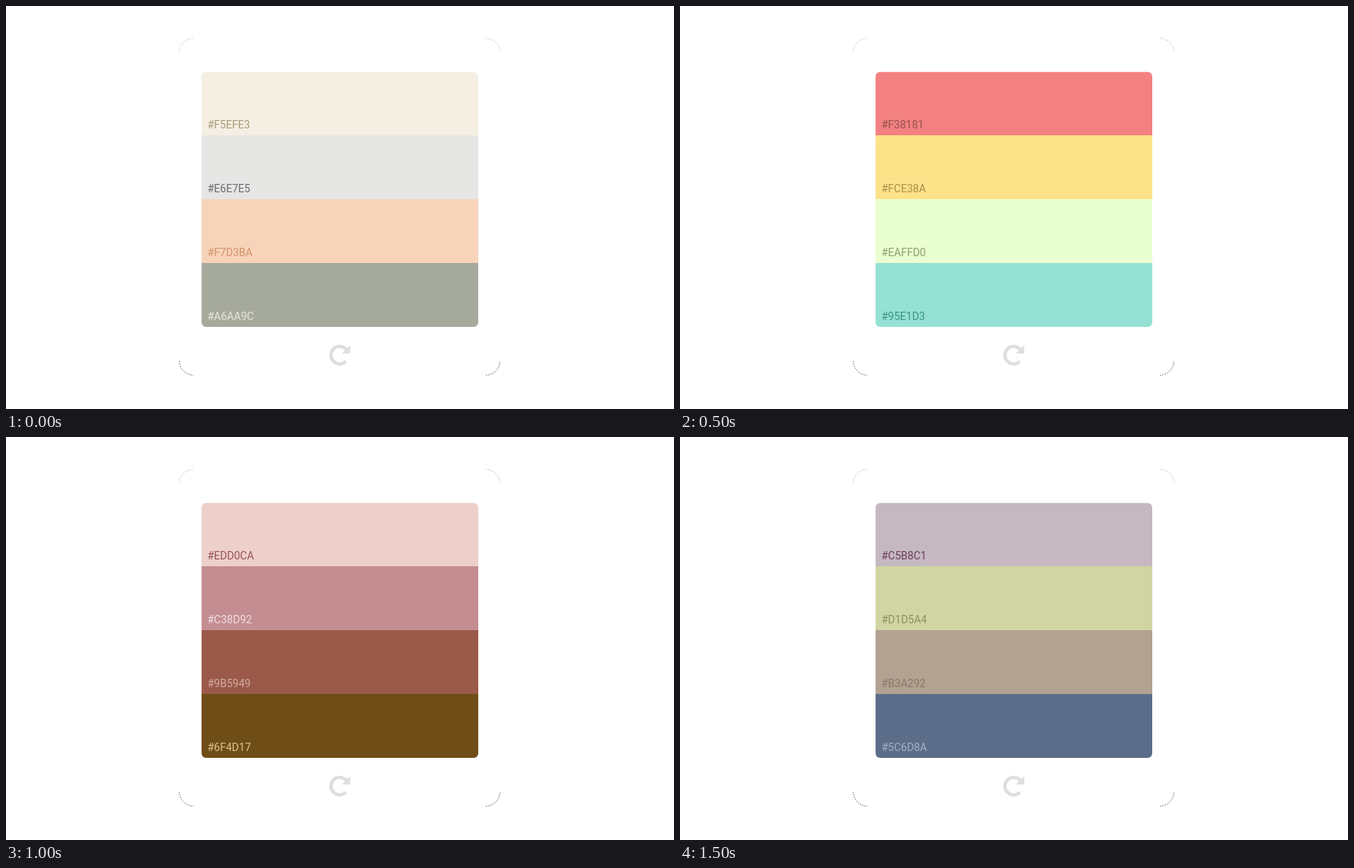
An HTML page that plays this animation: 877 px wide and 530 px high, repeating every 2000 ms.

```html
<!DOCTYPE html>
<html lang="en">
<head>
<meta charset="utf-8">
<title>Color palettes</title>
<style>
  html, body { margin: 0; width: 100%; height: 100%; overflow: hidden; background: #fff; }
  svg { display: block; }
  text { font: 14px Roboto, sans-serif; }
</style>
</head>
<body>
<svg width="877" height="530" viewBox="0 0 877 530">
  <defs>
    <clipPath id="panel"><rect x="256.7" y="86.7" width="363.3" height="335.3" rx="6"/></clipPath>
  </defs>
  <g fill="none" stroke-width="1">
    <path stroke="#999" stroke-dasharray="1 2.2" d="M227.5 60A19 18 0 0 1 246 42.5M630 42.5A19 18 0 0 1 648.5 60"/>
    <path stroke="#555" stroke-dasharray="1.5 1.6" d="M227.5 467A19 19 0 0 0 246 485.5M630 485.5A19 19 0 0 0 648.5 467"/>
  </g>
  <g id="bands" clip-path="url(#panel)"></g>
  <g id="labels"></g>
  <path fill="none" stroke="#dedede" stroke-width="4.4" d="M446.2 467.3A11.5 11.5 0 1 1 446.8 451.7"/>
  <path fill="#dedede" stroke="#dedede" stroke-linejoin="round" d="M451.3 447.2V456.6H441.9Z"/>
</svg>
<script>
const STEP = 500, BAND = 84, TOP = 86;

// Each entry: band colour, label colour
const palettes = [
  [["F5EFE3", "#a99a77"], ["E6E7E5", "#6b6b6b"], ["F7D3BA", "#d4926a"], ["A6AA9C", "#e6e8de"]],
  [["F38181", "#96504f"], ["FCE38A", "#a98f45"], ["EAFFD0", "#8a9f70"], ["95E1D3", "#3a9485"]],
  [["EDD0CA", "#985056"], ["C38D92", "#f0dfe1"], ["9B5949", "#d0aba0"], ["6F4D17", "#dcc28e"]],
  [["C5B8C1", "#6d3f61"], ["D1D5A4", "#8c9064"], ["B3A292", "#8a7767"], ["5C6D8A", "#a3b0c6"]],
];

function add(parent, tag, attrs) {
  const node = document.createElementNS("http://www.w3.org/2000/svg", tag);
  for (const key in attrs) node.setAttribute(key, attrs[key]);
  return document.getElementById(parent).appendChild(node);
}

const rows = [0, 1, 2, 3].map(i => {
  const y = TOP + i * BAND;
  return {
    band: add("bands", "rect", { x: 256, y, width: 365, height: BAND }),
    label: add("labels", "text", { x: 264.5, y: y + 75 }),
  };
});

let shown = -1;
function draw(now) {
  const index = Math.floor(now / STEP) % palettes.length;
  if (index !== shown) {
    shown = index;
    rows.forEach(({ band, label }, i) => {
      const [hex, ink] = palettes[index][i];
      band.setAttribute("fill", "#" + hex);
      label.setAttribute("fill", ink);
      label.textContent = "#" + hex;
    });
  }
}

const start = performance.now();
function tick() {
  draw(performance.now() - start);
  requestAnimationFrame(tick);
}
tick();
</script>
</body>
</html>
```
